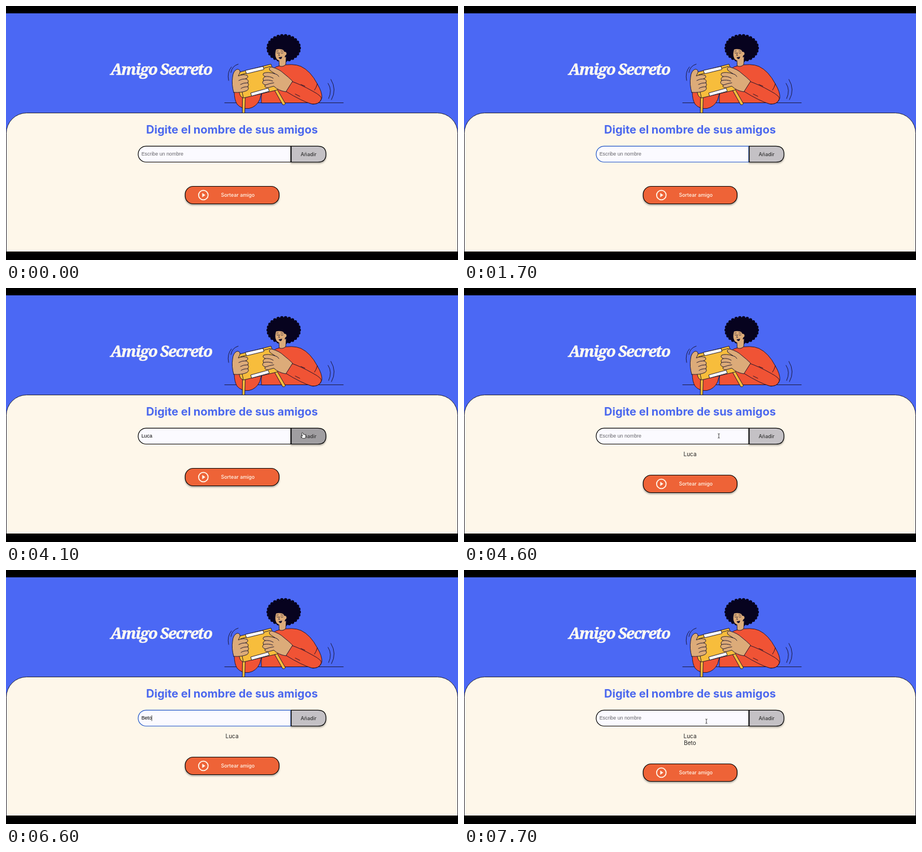
An HTML page that plays this animation: 800x450 px, repeating every 8 s.

```html
<!DOCTYPE html>
<html lang="es">
<head>
<meta charset="utf-8">
<title>Amigo Secreto</title>
<style>
html, body { margin: 0; width: 100%; height: 100%; overflow: hidden; background: #000; }
svg { display: block; width: 800px; height: 450px; }
text { font-family: Inter, sans-serif; }
.title { font: italic 700 27.5px "Noto Serif", serif; letter-spacing: -1.6px; fill: #fffaf3; stroke: #fffaf3; stroke-width: .5; }
.head { font-size: 20px; font-weight: 700; fill: #4b68ee; text-anchor: middle; }
.field { font: 8.85px "Liberation Sans", Arial, sans-serif; }
.btn { font-size: 8.9px; font-weight: 500; }
.list { font-size: 10px; fill: #222; text-anchor: middle; }
.art { stroke: #17112b; stroke-width: .9; stroke-linejoin: round; stroke-linecap: round; }
.line { fill: none; }
.red { fill: #f05335; }
.skin { fill: #dcab79; }
.gold { fill: #f7bd3c; }
.white { fill: #fbfaff; }
.edge { stroke: #000; stroke-width: 1.2; }
.soft { filter: drop-shadow(0 2px 1.6px rgba(0,0,0,.35)); }
</style>
</head>
<body>
<svg viewBox="0 0 800 450">
  <rect width="800" height="450" fill="#4b68f4"/>
  <text class="title" x="185" y="122">Amigo Secreto</text>

  <g class="art">
    <path class="line" d="M387 171.5H597"/>
    <path class="line" d="M399 108Q391 117 394 132M411 103Q400 106 398 118M570 137Q578 149 571 164M575 130Q586 148 576 166"/>
    <g id="hair" fill="#07031f" stroke="none"><ellipse cx="491.500" cy="75" rx="28" ry="23"/></g>
    <path class="red" d="M452 171.5Q450 150 462 128Q470 108 484 106Q508 101 522 107Q539 115 551 138Q560 153 559 163Q556 174 543 174L536 171.5Z"/>
    <path class="skin" d="M483 94L483.500 106Q489 109 495 104L496 90Z"/>
    <path class="skin" stroke="none" d="M478 77Q476 84 477 89Q479 97 486 97Q493 96 494 88Q498 86 495.500 81.500Q492 82 491 78Q485 75 478 77Z"/>
    <path class="line" stroke-width=".7" d="M479 83Q481 84.500 483 83M486.500 83Q488.500 84.500 490.500 83M484 83L482.500 87.500H484.500M479 80L482 79.500M486.500 79.500L490 80"/>
    <path fill="#17112b" stroke="none" d="M482.500 90.500Q486 91 488.500 89.500Q488.500 94 485.500 94Q483 93.500 482.500 90.500Z"/>
    <path class="red" d="M504 133Q522 139 543 151Q560 160 558 165Q554 175 541 173.500Q524 169 495 151Z"/>
    <path class="line" d="M551 138Q549 145 546 149M522 139L529 142M512 156L520 160"/>
    <path class="red" d="M404 152Q404 166 409 174Q417 183 430 181.500Q443 179 449 166L453 151Z"/>
    <path class="gold" d="M419 160H423.500L422.500 192H418.500ZM475 148L479 146L494.500 173Q493 176 490 175Z"/>
    <path class="gold" d="M410 118L469 103L484 146L479 149L420 163Q412 160 413 149Z"/>
    <path class="line" d="M413 128L420 162M415 122L468 107"/>
    <path class="white" d="M424 114L455 107L456.500 112.500L426 120ZM433.500 154L464 145.500L466 151L435 159.500Z"/>
    <path class="skin" d="M403 153Q399 139 401 126Q402 115 409 112Q415 112 414 118L411 124Q421 120 427 123Q430 127 424 129Q431 131 428 136Q431 139 428 143Q431 147 426 150Q417 154 403 153Z"/>
    <path class="line" d="M424 129Q417 129 412 132M428 136Q420 136 415 139M428 143Q420 143 416 146"/>
    <path class="skin" d="M507 133Q500 126 491 119Q484 112 470 108Q464 109 467 114L476 120Q463 116 456 119Q453 123 459 125Q453 128 456 132Q451 137 459 140Q456 144 463 145L474 142Q482 150 495 152Z"/>
    <path class="line" d="M459 125Q467 124 473 128M456 132Q465 130 472 133M459 140Q467 137 474 136M476 120Q481 121 483 125"/>
  </g>

  <rect x=".5" y="189.500" width="799" height="290" rx="36" fill="#fef7ea" stroke="#15131f" stroke-width=".9"/>
  <text class="head" x="400" y="226">Digite el nombre de sus amigos</text>

  <path id="add" class="edge soft" d="M504.500 248.300H552Q566.300 248.300 566.300 262.400Q566.300 276.500 552 276.500H504.500Z"/>
  <text class="btn" x="535.500" y="265.500" text-anchor="middle" fill="#333">Añadir</text>
  <path id="box" fill="#fbfaff" stroke-width="1.200" d="M504 248.300H248A14.100 14.100 0 0 0 248 276.500H504Z"/>
  <path d="M504.700 248V277" stroke="#000" stroke-width="1.400"/>
  <text id="field" class="field" x="239.700" y="265.400"></text>
  <path id="caret" d="M0 257.500V267.500" stroke="#111" stroke-width=".8"/>

  <text id="name0" class="list" x="400" y="298.200"></text>
  <text id="name1" class="list" x="400" y="310.200"></text>

  <g id="draw">
    <rect class="edge soft" x="317.200" y="319.500" width="166.200" height="31" rx="14" fill="#ee6337"/>
    <circle cx="349.300" cy="335" r="8.400" fill="none" stroke="#fff7ea" stroke-width="1.800"/>
    <path d="M347.300 331.200V338.800L352.800 335Z" fill="#fff7ea"/>
    <text class="btn" x="410.300" y="338.200" text-anchor="middle" fill="#fff7ea">Sortear amigo</text>
  </g>

  <g id="beam"><path d="M-1.700 -4Q0 -4 0 -2.800Q0 -4 1.700 -4M0 -3V3M-1.700 4Q0 4 0 2.800Q0 4 1.700 4" fill="none" stroke="#333" stroke-width=".9"/></g>
  <g id="hand"><path d="M-2.200 -4.500Q-1 -5.500 -.500 -4L.200 -1.800Q1.200 -2.400 1.700 -1.500Q2.800 -1.900 3.200 -.900Q4.400 -1 4.500 .500L4.400 2.800L3.500 5.300H-1L-3.800 2Q-4 .600 -2.500 1L-1.300 1.700L-2.600 -3Q-2.900 -4 -2.200 -4.500Z" fill="#fff" stroke="#111" stroke-width=".8"/></g>

  <path d="M0 0H800V13H0ZM0 435H800V450H0Z"/>
</svg>
<script>
const $ = id => document.getElementById(id);
const LOOP = 8000, NAMES = ["Luca", "Beto"];

// [time, name index, letters typed]
const TYPING = [
  [2000, 0, 1], [2800, 0, 2], [2900, 0, 3], [3000, 0, 4], [4200, 0, 0],
  [5400, 1, 1], [5700, 1, 2], [5800, 1, 3], [6200, 1, 4], [7400, 1, 0]
];
// [from, to, start of blinking]
const FOCUS = [[100, 4100, 0], [4900, 7300, 4800]];
const ADDED = [4200, 7400];
// runs of pointer keys: [time, x, y]
const MOVES = [
  [[3500, 446, 267], [3700, 482, 264], [3900, 520, 261], [4100, 526, 261], [4300, 526, 261],
   [4400, 506, 261], [4500, 470, 262], [4600, 451, 262], [4900, 451, 262]],
  [[6700, 451, 264], [6900, 480, 264], [7100, 524, 262], [7500, 526, 262],
   [7600, 480, 265], [7700, 429, 268], [8000, 429, 268]]
];

// curly rim of the hair
for (let i = 0; i < 26; i++) {
  const a = i / 26 * Math.PI * 2;
  const c = document.createElementNS("http://www.w3.org/2000/svg", "circle");
  c.setAttribute("cx", 491.5 + 27.5 * Math.cos(a));
  c.setAttribute("cy", 74.5 + 22 * Math.sin(a));
  c.setAttribute("r", 3);
  $("hair").append(c);
}

function pointer(t) {
  const run = MOVES.find(m => t >= m[0][0] && t < m[m.length - 1][0]);
  if (!run) return null;
  const i = run.findIndex(k => k[0] > t);
  const [t0, x0, y0] = run[i - 1], [t1, x1, y1] = run[i];
  const p = (t - t0) / (t1 - t0);
  return [x0 + (x1 - x0) * p, y0 + (y1 - y0) * p];
}

const show = (el, on) => el.setAttribute("visibility", on ? "visible" : "hidden");

function render(t) {
  const last = TYPING.filter(k => k[0] <= t).pop() || [0, 0, 0];
  const text = NAMES[last[1]].slice(0, last[2]);
  const field = $("field");
  field.textContent = text || "Escribe un nombre";
  field.setAttribute("fill", text ? "#000" : "#66656a");

  const focus = FOCUS.find(f => t >= f[0] && t < f[1]);
  $("box").setAttribute("stroke", focus ? "#2458c8" : "#000");
  const since = focus ? t - Math.max(focus[2], last[0]) : 0;
  show($("caret"), focus && Math.floor(since / 500) % 2 === 0);
  const x = 239.8 + (text ? field.getComputedTextLength() : 0);
  $("caret").setAttribute("transform", `translate(${x} 0)`);

  let count = 0;
  ADDED.forEach((at, i) => {
    const on = t >= at;
    $("name" + i).textContent = on ? NAMES[i] : "";
    count += on;
  });
  $("draw").setAttribute("transform", `translate(0 ${count * 12})`);

  const pos = pointer(t), over = pos && pos[0] > 504;
  $("add").setAttribute("fill", over ? "#a09ea1" : "#c4c1c5");
  show($("hand"), over);
  show($("beam"), pos && !over);
  if (pos) $(over ? "hand" : "beam").setAttribute("transform", `translate(${pos})`);
}

const start = performance.now();
function tick() {
  const t = (performance.now() - start) % LOOP;
  render(Math.floor(t / 100) * 100);
  requestAnimationFrame(tick);
}
tick();
</script>
</body>
</html>
```
